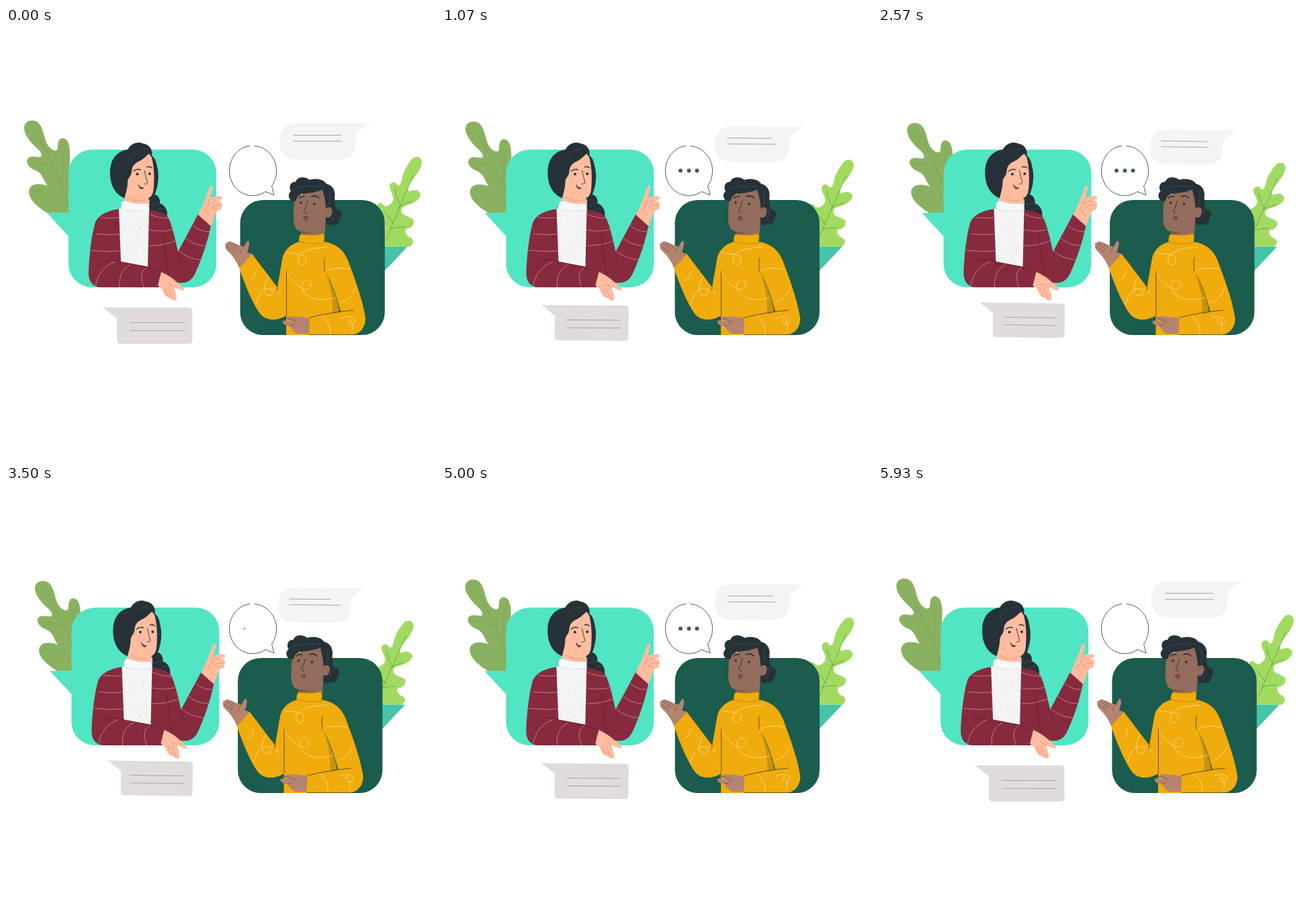
An HTML page that plays this animation: 640x640 px, repeating every 6000 ms.

```html
<!DOCTYPE html>
<html lang="en">
<head>
<meta charset="utf-8">
<title>Conversation</title>
<style>
html, body { margin: 0; width: 100%; height: 100%; overflow: hidden; background: #fff; }
svg { display: block; width: 100vw; height: 100vh; }
path { stroke-linecap: round; stroke-linejoin: round; }
.line { fill: none; stroke: #263238; stroke-width: .9; }
.thin { fill: none; stroke-width: .65; }
.hair { fill: #263238; }
.shine { fill: none; stroke: #46545b; stroke-width: .7; }
.skinA { fill: #ffbc9f; }
.creaseA { fill: none; stroke: #e58f70; stroke-width: .8; }
.skinB { fill: #b58470; }
.creaseB { fill: none; stroke: #76503f; stroke-width: .8; }
.swirls { fill: none; stroke: #fbdc8c; stroke-width: .9; }
</style>
</head>
<body>
<svg viewBox="0 0 640 640">
  <defs>
    <clipPath id="clipL"><rect width="320" height="275.5"/></clipPath>
    <clipPath id="clipR"><rect x="320" width="320" height="325.5"/></clipPath>
  </defs>

  <g clip-path="url(#clipL)"><g id="leafL">
    <path fill="#8ab160" d="M62 276C47 266 34 256 34 243C36 230 51 231 62 235C56 228 55 216 44 212C34 208 29 200 32 195C36 189 43 192 51 192C55 190 52 184 46 179C36 170 26 158 27 147C29 136 43 135 49 142C57 152 56 164 62 174C68 183 76 185 77 179C77 172 78 163 85 164C92 165 94 173 95 182C96 196 93 215 94 235L110 285H70Z"/>
    <path class="thin" stroke="#729a50" d="M44 152C60 185 79 218 94 266M87 180C82 195 87 212 82 231M43 201Q60 200 72 208"/>
    <path class="thin" stroke="#6a9c72" d="M40 241C58 245 76 251 94 262"/>
  </g></g>

  <g clip-path="url(#clipR)"><g id="leafR">
    <path fill="#a2da61" d="M600 327C606 322 609 316 602 312C596 310 592 302 596 299C604 298 609 291 606 285C602 281 591 280 589 274C588 268 590 266 596 264C605 262 616 256 617 248C616 240 606 240 601 243C597 243 598 236 602 230C610 220 618 210 619 200C618 190 610 190 605 194C597 204 592 213 590 222C589 229 586 238 582 233C579 227 571 229 571 236C572 245 580 252 575 259C570 266 564 267 560 262C557 258 552 262 553 265C556 270 562 278 564 290C565 302 563 314 560 327Z"/>
    <path class="thin" stroke="#4d8b3f" d="M607 217C594 249 579 282 567 313M579 240Q581 254 587 263M584 267Q594 260 604 258M572 299Q581 296 593 296M562 272Q571 282 576 291"/>
  </g></g>

  <g id="woman">
    <path fill="#51e5c3" d="M61 275.300H95V312Z"/>
    <rect x="93" y="181" width="220" height="205" rx="35" fill="#51e5c3"/>
    <path class="hair" d="M215 249C222 245 230 250 229 261C238 264 242 274 239 283C231 287 221 283 212 268Z"/>
    <path class="shine" d="M217 264Q227 259 229 261M222 276Q229 266 235 269"/>
    <path class="hair" d="M178 254C159 247 154 228 155 212C156 194 166 183 181 181C186 172 196 168 204 172C212 173 219 180 217 190C224 195 224 203 226 211C228 224 226 237 221 249C214 260 196 260 178 254Z"/>
    <path class="skinA" d="M213 187C209 190 205 195 199 198C190 202 188 206 187 213C187 221 181 222 181 230C181 238 178 247 175 259L214 264L212 253C218 251 220 243 220 234C221 219 220 205 217 193Z"/>
    <path class="creaseA" d="M182 252Q193 260 207 256"/>
    <path class="shine" d="M181 198C185 187 195 180 207 180"/>
    <g class="hair"><circle cx="195.500" cy="217.500" r="2"/><circle cx="213.800" cy="217" r="2"/></g>
    <path class="line" style="stroke-width:1.500" d="M190 213Q195 209 200 211M210 207Q213 205 217 208"/>
    <path class="line" d="M206 212Q208 222 210.500 230Q209 233 205.500 232"/>
    <path fill="#8d3c3c" stroke="#263238" stroke-width=".7" d="M197.500 233.500Q200 238 205 238Q201 241 199 238Z"/>
    <path fill="#872a3e" d="M170 269C150 272 138 278 133 289C127 308 124 340 123 362C122 378 130 386 142 386H227L232 364L236 370C241 378 254 380 265 379C273 378 279 372 283 362C292 342 300 318 305 294L286 277L256 333C251 310 247 294 242 283C237 274 224 272 212 271Z"/>
    <path fill="#f4f4f4" d="M168 269L213 270L211 355L171 348Z"/>
    <path id="knit" class="thin" stroke="#dcdcdc"/>
    <path fill="#f8f8f8" stroke="#cfcfcf" stroke-width=".6" d="M172 260Q174 256 180 258Q195 263 209 261Q214 262 213 271Q190 275 171 269Z"/>
    <path id="stripes" class="thin" stroke="#dba6ad"/>
    <path class="thin" stroke="#5a1928" d="M142 347Q158 343 172 348Q204 354 231 364M235 306Q237 340 243 369M256 333Q258 341 260 347"/>
    <path class="skinA" d="M286 278L296 256L303 237C304 233 309 234 308 238L304 253C312 249 321 249 322 253C322 256 317 256 313 257C319 256 323 260 321 264C322 270 319 272 315 271C311 277 309 285 305 295Z"/>
    <path class="creaseA" d="M304 253Q300 259 301 263M313 257Q304 258 299 267M321 264Q312 261 305 268M315 271Q310 271 307 267M297 267Q297 274 303 278"/>
    <path class="skinA" d="M231 363C240 367 248 372 254 378C260 382 266 388 265 390C262 392 257 388 250 386C252 393 256 402 253 405C250 407 246 403 243 401C238 402 234 394 232 388L226 383Z"/>
    <path class="creaseA" d="M250 386Q244 381 240 380M249 404Q244 394 242 387M243 401Q237 393 237 387"/>
  </g>

  <g id="man">
    <path fill="#46c3a8" d="M562 325.500H597.500L562 363Z"/>
    <rect x="348.500" y="256" width="215.300" height="201" rx="34" fill="#1b5c4e"/>
    <path class="hair" d="M426 258C420 254 419 247 424 243C420 236 424 228 431 229C434 220 446 221 452 226C461 223 473 225 477 232C487 234 491 244 489 253C490 260 489 266 492 270C499 270 502 278 497 282C498 290 490 295 485 292C480 296 475 292 476 287L474 258L440 246Z"/>
    <path fill="#946d5c" d="M431 249C446 247 458 243 471 240C473 248 476 257 476 269C481 264 487 268 485 275C484 282 479 284 476 281L474 313L439 312L440 303C431 302 429 294 428 287C428 273 428 260 431 249Z"/>
    <path class="hair" d="M422 250C423 256 428 259 432 257C432 251 437 247 443 246C455 246 464 243 471 241L460 231L430 236Z"/>
    <path fill="#805a4b" d="M439 302Q449 305 457 302Q449 308 439 308Z"/>
    <path class="shine" d="M430 240C442 232 456 238 473 235M481 243Q484 257 480 263M487 270Q490 278 484 287"/>
    <path class="creaseB" d="M477 272Q481 269 482 272"/>
    <g class="hair"><circle cx="439" cy="260" r="1.800"/><circle cx="459" cy="262" r="1.800"/></g>
    <path class="line" style="stroke-width:1.500" d="M436 253Q439 250 444 251M455 251Q461 248 466 253"/>
    <path class="line" d="M449 257Q447 266 443 273Q444 276 448 275"/>
    <path id="mouth" fill="#a5483f" stroke="#3c2b2b" stroke-width=".7" d="M443 281.500Q446 279.500 449 281Q450 286 446 287Q443 286 443 281.500Z"/>
    <path fill="#f0ab0d" d="M437 318C422 322 413 332 411 345L404 386L366 336L347 357C354 378 367 410 378 425C386 436 403 437 417 428V457H515C528 455 536 444 535 431C530 400 516 365 509 346C502 328 488 320 472 318Z"/>
    <path fill="#f0ab0d" stroke="#b77c0a" stroke-width=".7" d="M436 317Q436 306 441 307Q458 310 472 306Q475 308 473 320Q455 323 436 318Z"/>
    <path fill="#c8930f" d="M475 362C482 382 487 402 486 426L497 423L489 391Z"/>
    <path fill="#1b5c4e" d="M477 365Q489 388 498 422L496 423Q495 406 477 365Z"/>
    <g class="swirls">
      <path d="M418 334C434 338 447 335 447 345C446 356 434 354 435 343C438 330 462 327 480 326"/>
      <path d="M417 363C424 376 438 390 449 389C457 386 455 375 447 375C438 377 439 390 447 397C458 406 476 406 490 401"/>
      <path d="M362 376Q371 374 372 362M372 411C376 397 382 386 391 388C400 391 399 399 391 398C381 396 384 382 390 371M395 388Q403 389 410 397"/>
      <path d="M477 361Q490 355 511 359M498 409Q514 404 519 388M470 428Q483 437 483 456M498 433C506 427 520 429 520 436C517 444 507 441 509 435C512 428 519 442 514 452"/>
    </g>
    <path class="line" style="stroke-width:.7" d="M417.500 362V428M404 386L403 391M452 431Q483 423 517 420M452 456.500H520M474 362C474 352 472 347 475 342"/>
    <path class="skinB" d="M347 357C343 347 339 342 334 336C328 331 325 326 327 325C325 321 327 319 330 320C330 317 333 317 336 319C341 320 349 325 354 325C357 322 358 315 361 317C364 321 360 330 359 334L366 336Z"/>
    <path class="creaseB" d="M328 325L340 333M330 320L343 329M336 319L346 326M354 325Q350 329 349 335"/>
    <path class="skinB" d="M452 432L451 455L434 455C428 453 425 447 422 443C416 444 411 440 412 436C416 434 420 437 424 436L417 433C418 428 426 429 440 430Z"/>
    <path class="creaseB" d="M418 432Q428 434 434 438M422 443Q428 443 430 440"/>
  </g>

  <g id="note">
    <path fill="#f4f4f4" d="M434 141.500H542L521 157V170Q521 196 495 196H434Q407 196 407 169Q407 141.500 434 141.500Z"/>
    <path id="noteLines" class="thin" stroke="#777"/>
  </g>
  <g id="reply">
    <path fill="#e0dcdb" d="M144 416H272Q277.500 416 277.500 422V464Q277.500 470 272 470H170Q165 470 165 464V432Z"/>
    <path id="replyLines" class="thin" stroke="#858282"/>
  </g>

  <path fill="#fff" stroke="#37474f" stroke-width=".9" d="M370 175.600C388 177 402.500 193 402.500 212C402.500 221 400 229 395.500 235L399 248.500L386 243.500C381 247.500 374 249.500 367.500 249.500C348 249.500 332.500 233 332.500 212.500C332.500 193 346 177 363 175.600"/>
  <g id="dots" fill="#455a64"><circle cx="355" cy="212.300"/><circle cx="367.500" cy="212.300"/><circle cx="379.500" cy="212.300"/></g>
</svg>
<script>
const LOOP = 6000;
const $ = id => document.getElementById(id);
const dots = [...$('dots').children];
const clamp = v => Math.max(0, Math.min(1, v));
const move = (id, value) => $(id).setAttribute('transform', value);
const draw = (id, d) => $(id).setAttribute('d', d);

// Three evenly spaced bowed bands between two edges of a sleeve.
function bands([x1, y1], [x2, y2], [dx1, dy1], [dx2, dy2], [bowX, bowY]) {
  return [0, 1, 2].map(i => {
    const ax = x1 + dx1 * i, ay = y1 + dy1 * i;
    const bx = x2 + dx2 * i, by = y2 + dy2 * i;
    return `M${ax} ${ay}Q${(ax + bx) / 2 + bowX} ${(ay + by) / 2 + bowY} ${bx} ${by}`;
  }).join('');
}

function knitFlecks() {
  let seed = 7, d = '';
  const random = () => (seed = seed * 16807 % 2147483647) / 2147483647;
  for (let i = 0; i < 12; i++) {
    d += `M${175 + 31 * random()} ${278 + 66 * random()}l${6 * random() - 3} 5`;
  }
  return d;
}

// Shift, tilt and shrink about one anchor point.
function pose(id, p, x, y, dx, dy, angle, sx, sy) {
  move(id, `translate(${x + dx * p} ${y + dy * p}) rotate(${angle * p}) ` +
    `scale(${1 - sx * p} ${1 - sy * p}) translate(${-x} ${-y})`);
}

function dotRadius(t, i) {
  const pulse = (start, end) => Math.min(
    clamp((t - start - i * 95) / 280),
    clamp((end - t - (2 - i) * 70) / 200));
  return 3 * Math.max(pulse(250, 3100), pulse(3400, 5920));
}

function render(t) {
  const swing = Math.sin(Math.PI * t / LOOP);
  const drift = Math.pow(swing, 1.15);
  const wave = Math.sin(6 * Math.PI * t / LOOP);

  move('woman', `translate(${4.6 * swing} 0)`);
  move('man', `translate(${-3.6 * swing} 0)`);
  pose('leafL', drift, 70, 275, 15.3, 0, 0.7, 0, 0.03);
  pose('leafR', drift, 580, 325, -12.7, 0, 0, 0, 0.07);
  pose('note', drift, 407, 141.5, -2, 9.6, 0.7, 0.05, 0.05);
  pose('reply', drift, 277.5, 416, 0.7, -6, 0.8, 0.052, 0.052);
  pose('mouth', swing, 446, 284, 0, 0, 0, 0.15, 0.2);

  const noteX = 428 - 3 * swing;
  draw('noteLines', `M${noteX} 159.5H${499 - 7 * swing + 4 * wave}` +
    `M${noteX} 168.5H${499 + 2.5 * (swing - wave)}`);
  draw('replyLines', `M${185 - 4 * swing + 2 * wave} 438.5H${266 - 2 * swing}` +
    `M${186 - 4.5 * swing} 450.5H${266 - 2 * swing}`);
  dots.forEach((dot, i) => dot.setAttribute('r', dotRadius(t, i)));
}

draw('knit', knitFlecks());
draw('stripes',
  bands([141, 282], [169, 282], [-7, 24.5], [0.5, 25], [0, 2]) +
  bands([213.5, 277], [243, 283], [0, 23.5], [4.5, 17], [0, 4]) +
  bands([278, 294], [303, 303], [-10.5, 19], [-7, 21], [-2, 5]) +
  bands([133, 385], [162, 348], [36, 0.5], [23.5, 4.5], [-10, -9]));

const start = performance.now();
function tick() {
  render((performance.now() - start) % LOOP);
  requestAnimationFrame(tick);
}
tick();
</script>
</body>
</html>
```
